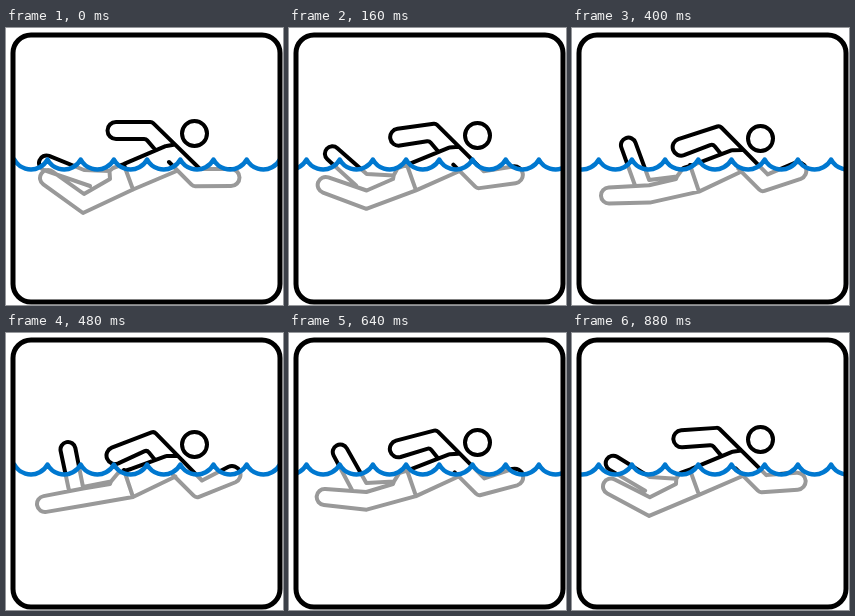
Write an HTML page with a canvas that moves like this. It is 277x277 px and loops after 960 ms.

```html
<!DOCTYPE html>
<html lang="en">
<head>
<meta charset="utf-8">
<title>Swimmer</title>
<style>
html, body { margin: 0; width: 100%; height: 100%; overflow: hidden; background: #fff; }
canvas { display: block; }
</style>
</head>
<body>
<canvas id="stage" width="277" height="277"></canvas>
<script>
const ctx = document.getElementById('stage').getContext('2d');
const STEP = 80, HALF = 6;
const WAVE = { length: 33.2, crest: 131.5, depth: 10, start: 8.3, drift: 9.2 };

const mix = (a, b, k) => a.map((v, i) => v + (b[i] - v) * k);

// Extends the path through the points, rounding the corners between them
function extend(points, radius) {
  points.forEach(([x, y], i) => {
    const next = points[i + 1];
    if (next) ctx.arcTo(x, y, ...next, radius);
    else ctx.lineTo(x, y);
  });
}

function line([first, ...rest], radius = 0) {
  ctx.moveTo(...first);
  extend(rest, radius);
}

// Limb outline: along one edge, round the tip, back along the other edge
function limb(before, [x, y], size, after, radius = 0) {
  const edge = before[before.length - 1];
  const [mx, my] = mix(edge, after[0], 0.5);
  const angle = Math.atan2(y - my, x - mx);
  const side = Math.sign(Math.cos(angle) * (edge[1] - my) - Math.sin(angle) * (edge[0] - mx));
  const from = angle + side * Math.PI / 2, to = angle - side * Math.PI / 2;
  line([...before, [x + size * Math.cos(from), y + size * Math.sin(from)]], radius);
  ctx.arc(x, y, size, from, to, side > 0);
  extend(after, radius);
}

// k runs from 0 (lower leg hanging) to 1 (heel lifted)
function swimmer(k, color) {
  const at = (a, b, t = k) => mix(a, b, t);
  const quick = 1 - (1 - k) ** 4;
  const swing = k * Math.PI / 2;

  const elbow = at([146, 94], [148, 98.5]);
  const armpit = at([194, 141], [196, 147.5]);
  const waist = at([127, 161.5], [127, 164]);
  const hip = at([103.5, 143], [105, 148.5], quick);
  const back = at([107, 140], [112, 140]);
  const highFoot = [62 - 21.5 * Math.cos(swing), 135 - 18.5 * Math.sin(swing)];
  const lowFoot = [42 - 3 * k - 5 * Math.sin(Math.PI * k), 150 + 21 * k];

  ctx.beginPath();
  ctx.arc(188.5, 105.5 + 6 * k, 12.5, 0, 7);

  // rear arm with shoulder line, then front arm
  limb([at([149, 121.5], [149, 127]), at([140, 111], [141, 117])],
    at([110, 102.5], [109, 122.5]), 8.5, [elbow, armpit], 4);
  limb([at([163, 134], [167, 142]), at([187, 158.2], [190, 165])],
    at([225, 149.5], [226, 141.5]), 8.5, [armpit], 5);

  // back and waist
  line([hip, back, at([118, 136], [125, 136]), at([160, 118], [160, 123]),
    at([169, 116.5], [170, 123])], 4);
  line([[118, 137], waist]);

  // lower leg, then raised leg
  limb([[169.5, 143.5], waist, at([77, 185], [78, 172.5])], lowFoot, 8,
    [at([78, 166], [77, 155.5]), [104, 151], hip]);
  limb([at([84, 158], [63, 157.5], quick)], highFoot, 7.5,
    [at([78, 142], [77, 154]), hip]);

  ctx.strokeStyle = color;
  ctx.lineWidth = 4;
  ctx.stroke();
}

// Row of circular scallops; returns the x where it ends
function wavePath(left) {
  const half = WAVE.length / 2;
  const radius = (half ** 2 + WAVE.depth ** 2) / (2 * WAVE.depth);
  const angle = Math.acos(half / radius);
  ctx.beginPath();
  let x = left;
  for (; x < 290; x += WAVE.length) {
    ctx.arc(x + half, WAVE.crest + WAVE.depth - radius, radius, Math.PI - angle, angle, true);
  }
  return x;
}

function clipped(left, edge, draw) {
  ctx.save();
  const right = wavePath(left);
  ctx.lineTo(right, edge);
  ctx.lineTo(left, edge);
  ctx.clip();
  draw();
  ctx.restore();
}

function render(now) {
  const step = Math.floor(now / STEP) % (2 * HALF);
  const k = 1 - Math.abs(1 - step / HALF);
  const left = WAVE.start + WAVE.drift * (Math.floor(step / 2) % 3) - WAVE.length;

  ctx.fillStyle = '#fff';
  ctx.fillRect(0, 0, 277, 277);
  ctx.lineJoin = ctx.lineCap = 'round';
  clipped(left, 277, () => swimmer(k, '#999'));
  clipped(left, 0, () => swimmer(k, '#000'));

  ctx.save();
  ctx.beginPath();
  ctx.rect(9, 0, 263, 277);
  ctx.clip();
  wavePath(left);
  ctx.strokeStyle = '#0078d0';
  ctx.lineWidth = 4.5;
  ctx.stroke();
  ctx.restore();

  ctx.beginPath();
  ctx.roundRect(7, 7, 267, 267, 18);
  ctx.strokeStyle = '#000';
  ctx.lineWidth = 5;
  ctx.stroke();
}

const start = performance.now();
function tick() {
  render(performance.now() - start);
  requestAnimationFrame(tick);
}
tick();
</script>
</body>
</html>
```
